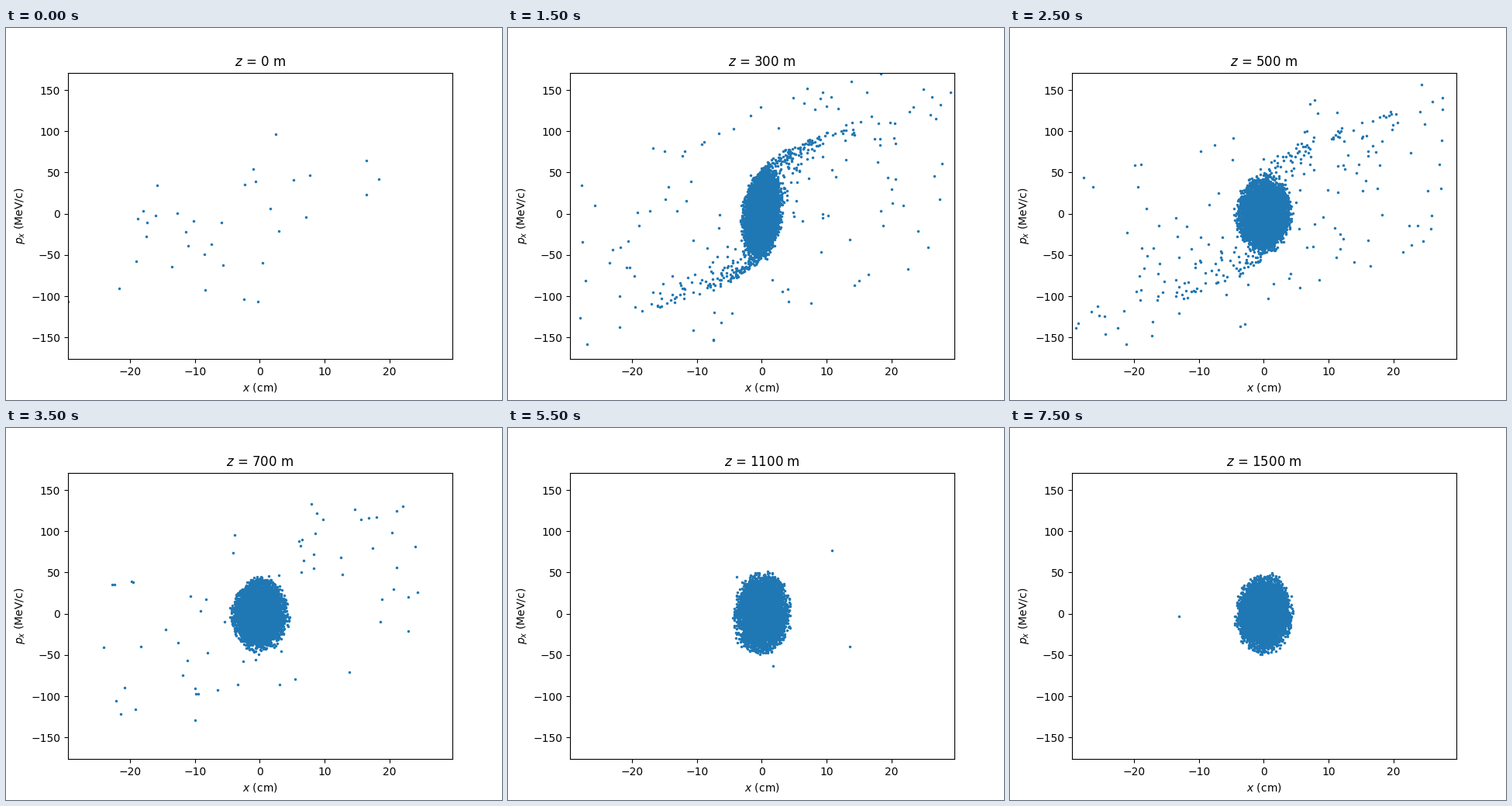
A matplotlib script that plays this animation: 640x480 px, repeating every 8000 ms.

```python
import numpy as np
import matplotlib.pyplot as plt
from matplotlib.animation import FuncAnimation

STEPS = 16
INTERVAL = 500


def injected(rng, n=34):
    """Loose cloud at the channel entrance."""
    x = np.clip(rng.normal(-3, 14, n), -29.5, 29.5)
    p = np.clip(2.4 * x + rng.normal(0, 45, n), -107, 105)
    return np.column_stack([x, p])


def core(rng, step, n):
    """Captured beam: an ellipse that breathes and settles upright."""
    width = np.interp(step, [3, 5], [3.4, 4.8])
    tilt = np.interp(step, [2, 4], [1.1, 0.2])
    phase = 2 * np.pi * (step - 3) / 7
    height = 53 + 8 * np.cos(phase) * np.exp(-abs(step - 3) / 8)

    r = np.sqrt(1 - (1 - rng.random(n)) ** (1 / 2.8))
    a = rng.uniform(0, 2 * np.pi, n)
    u, v = r * np.cos(a), r * np.sin(a)
    return np.column_stack([width * u + tilt * v, height * v])


def tails(rng, step, n):
    """Two curved arms of particles that leak out of the beam."""
    reach = min(9, 2 * step - 1)
    spread = min(20, 4 + 3 * step)
    x = rng.exponential(reach, n)
    p = 52 + 10 * x ** 0.66 - rng.exponential(spread, n)
    p += rng.normal(0, 2, n)
    sign = np.where(rng.random(n) < 0.56, 1, -1)
    return np.column_stack([sign * x, sign * p])


def halo(rng, step, n):
    """Scattered particles around the diagonal."""
    extent = 1 - 0.05 * max(step - 4, 0)
    x = rng.uniform(-29.5, 29.5, n) * extent
    p = 3 * x + rng.uniform(-140, 140, n) * extent
    keep = np.abs(p) < 174 * extent
    return np.column_stack([x, p])[keep]


def decay(step, start, scale, power):
    return np.exp(-(max(step - start, 0) / scale) ** power)


def particles(step):
    rng = np.random.default_rng(40 + step)
    if step == 0:
        return injected(rng)
    fill = min(1, step / 2)
    n_tail = int(420 * fill * decay(step, 3, 2.4, 2))
    n_halo = int(np.ceil(110 * fill * decay(step, 4, 3.3, 1.6)))
    return np.vstack([
        core(rng, step, int(5000 * fill)),
        tails(rng, step, n_tail),
        halo(rng, step, n_halo),
    ])


fig, ax = plt.subplots(figsize=(6.4, 4.8), dpi=100)
dots, = ax.plot([], [], '.', ms=3, color='C0')
ax.set_xlim(-29.55, 29.7)
ax.set_ylim(-176.33, 171.17)
ax.set_xticks(range(-20, 21, 10))
ax.set_yticks(range(-150, 151, 50))
ax.set_xlabel('$x$ (cm)')
ax.set_ylabel('$p_x$ (MeV/c)')
title = ax.set_title('$z$ = 0 m')


def update(step):
    dots.set_data(*particles(step).T)
    title.set_text(f'$z$ = {100 * step} m')
    return dots, title


anim = FuncAnimation(fig, update, frames=STEPS, interval=INTERVAL,
                     repeat=True, repeat_delay=0, blit=False)
plt.show()
```
